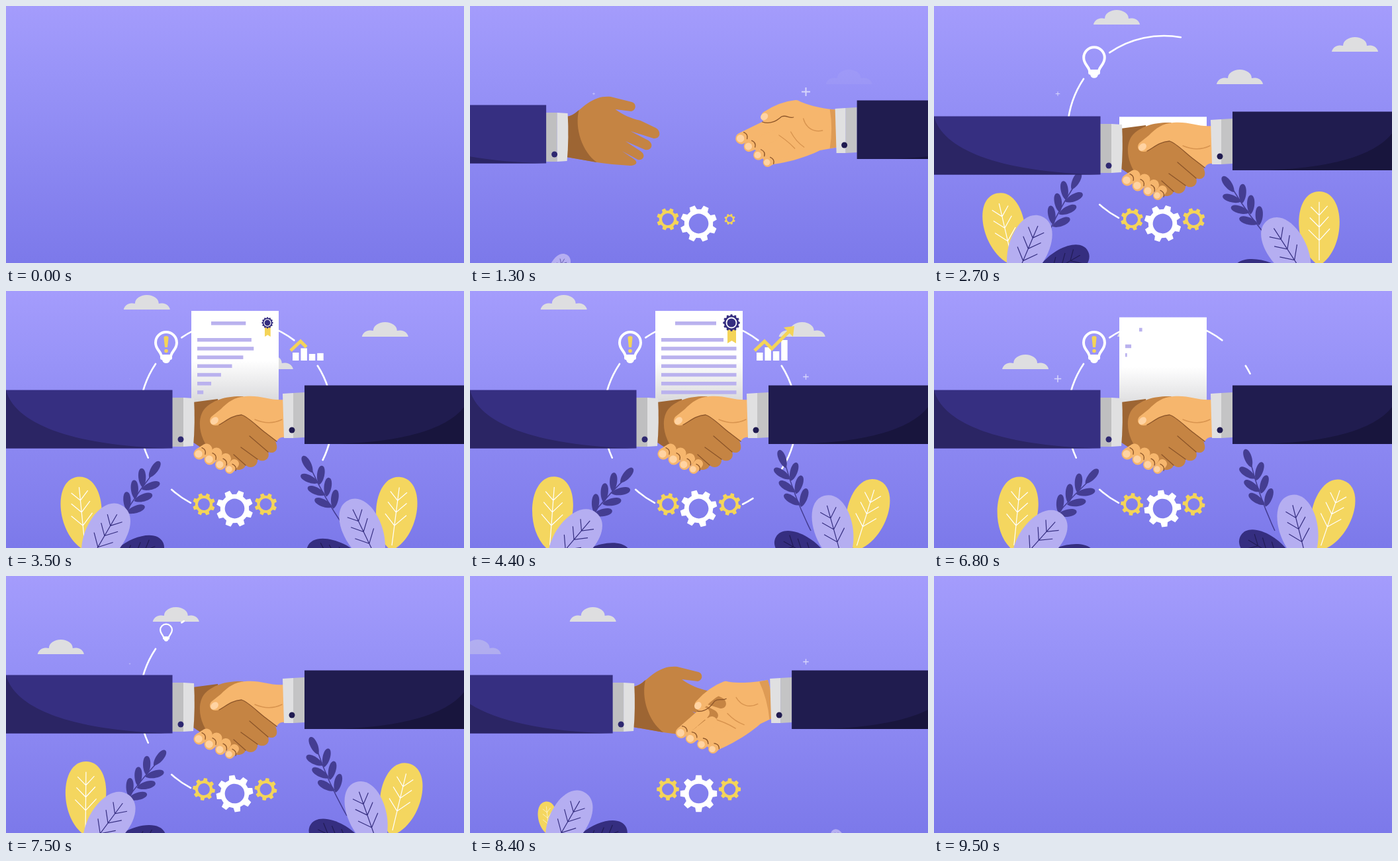
Animation of 692x388 px, one loop 10000 ms. Source, as an HTML page:

```html
<!DOCTYPE html>
<html lang="en">
<head>
<meta charset="utf-8">
<title>Handshake</title>
<style>
html, body { margin: 0; width: 100%; height: 100%; overflow: hidden; background: #8e8af3; }
svg { display: block; width: 100%; height: 100%; }
.brown { fill: #c58443; }
.brownShade { fill: #9d6533; }
.tan { fill: #f6b66d; }
.finger { stroke: #f6b66d; stroke-linecap: round; fill: none; }
.nail { fill: #ffd3a2; }
.crease { fill: none; stroke: #8c5529; stroke-width: 1.3; stroke-linecap: round; }
.soft { fill: none; stroke: #d8944f; stroke-width: 1.4; stroke-linecap: round; }
</style>
</head>
<body>
<svg viewBox="0 0 692 388">
  <defs>
    <linearGradient id="sky" x2="0" y2="1">
      <stop offset="0" stop-color="#a49cfc"/><stop offset=".25" stop-color="#9994f8"/>
      <stop offset="1" stop-color="#7c79ea"/>
    </linearGradient>
    <linearGradient id="paper" gradientUnits="userSpaceOnUse" x1="0" y1="75" x2="0" y2="136">
      <stop offset="0" stop-color="#fff"/><stop offset="1" stop-color="#dadadc"/>
    </linearGradient>
    <clipPath id="above"><rect width="692" height="190"/></clipPath>
  </defs>
  <rect width="692" height="388" fill="url(#sky)"/>
  <g id="clouds" fill="#dedee0"></g>
  <g id="sparks" stroke="#fff" stroke-width="2" opacity=".62"></g>
  <g id="arcs" fill="none" stroke="#fff" stroke-width="2.6" stroke-linecap="round"></g>

  <g id="bulb">
    <path d="M235 98C233 90 226 88 226 78A16 16 0 0 1 258 78C258 88 251 90 249 98Z" fill="none" stroke="#fff" stroke-width="4"/>
    <path d="M233 96H251V101Q251 104 248 104Q247 109 242 109Q237 109 236 104Q233 104 233 101Z" fill="#fff"/>
    <g id="mark" fill="#f4d458"><path d="M238.5 71Q238 68 242 68Q246 68 245.500 71L244 85H240Z"/><circle cx="242" cy="90.500" r="2.800"/></g>
  </g>

  <g id="chart">
    <g id="bars" fill="#fff"></g>
    <path id="trend" d="M430 90L445 76L456 87L483 60" pathLength="1" stroke-dasharray="1 2" fill="none" stroke="#f4d458" stroke-width="5"/>
    <path id="arrow" d="M474 55L490 53L488 69Z" fill="#f4d458"/>
  </g>

  <g clip-path="url(#above)"><g id="doc">
    <rect x="280" width="132" height="170" fill="url(#paper)"/>
    <g id="lines" fill="#bab2ee"></g>
    <g id="badge">
      <path d="M-6 8H7V31L.5 27L-6 31Z" fill="#f4d458"/>
      <path id="rosette" fill="#352e80"/>
      <circle r="7.500" fill="#352e80" stroke="#fff" stroke-width="1.800"/>
    </g>
  </g></g>

  <g id="plants"></g>

  <g id="shake">
    <g id="clasp">
      <path class="brownShade" d="M282 168L320 163L330 240L300 240L282 228Z"/>
      <path class="brown" d="M300 178C312 164 335 158 358 159L400 200L409 233C411 243 402 246 396 243C400 254 388 260 380 254C381 264 370 270 362 263C360 270 350 272 344 268L312 244C294 228 286 195 300 178Z"/>
      <path class="crease" d="M355 236L380 254M368 219L396 243M344 247L362 263"/>
      <path class="tan" d="M420 164C400 166 385 157 362 159C345 160 335 168 325 178L310 190C304 198 312 206 322 202C332 197 340 188 356 187C366 190 380 205 392 214L409 227C412 222 416 220 420 221Z"/>
      <path class="crease" d="M322 202C332 197 340 188 356 187C366 190 380 205 392 214L409 227"/>
      <path class="soft" d="M376 194C390 200 405 200 417 194"/>
      <ellipse class="nail" cx="315" cy="196" rx="6.500" ry="5" transform="rotate(-40 315 196)"/>
      <g id="claspFingers"></g>
    </g>
    <g id="openHands">
      <g class="rightOpen"><g class="turn">
        <path class="tan" d="M556 157C530 155 512 150 500 145C490 140 470 146 458 165C440 180 420 190 415 200L450 240C480 237 510 227 528 218L556 213Z"/>
        <path d="M543 156L556 157V213L543 215Q548 185 543 156Z" fill="#de9b55"/>
        <path class="soft" d="M503 170C507 184 518 191 532 188M458 190Q478 202 490 215M484 190Q492 205 504 213"/>
      </g></g>
      <g id="leftOpen"><g transform="translate(136)">
        <path class="brown" d="M146 167C160 165 166 155 178 147C190 139 200 136 213 137L245 145C252 147 252 157 244 159L220 156C232 165 245 170 258 173L281 184C290 189 288 201 278 200L243 189L270 203C279 209 274 219 265 217L235 204L258 219C267 225 262 234 254 232L230 219L248 231C256 237 250 241 242 241C225 240 205 238 192 236L146 228Z"/>
        <path class="brownShade" d="M146 167C156 166 161 160 165 157C158 185 170 220 192 236L146 228Z"/>
      </g></g>
      <g class="rightOpen"><g class="turn">
        <g id="openFingers"></g>
        <path class="finger" stroke-width="16" d="M492 150Q470 152 447 167"/>
        <path class="crease" d="M441 175C455 180 465 171 470 167C478 164 481 170 488 168"/>
        <ellipse class="nail" cx="444" cy="167" rx="6" ry="5" transform="rotate(-40 444 167)"/>
      </g></g>
    </g>
    <g id="leftArm">
      <path d="M251 161H268V235H251Z" fill="#bfbfc0"/>
      <path d="M268 161L284 162Q286 200 283 234L268 235Z" fill="#e0e0e1"/>
      <circle cx="264" cy="224" r="4.500" fill="#2e2870"/>
      <path d="M-200 149.500H251.500V237.500H-200Z" fill="#362f81"/>
      <path d="M0 149.500C12 198 95 234 251 237.500H-200V149.500Z" fill="#2b2564"/>
    </g>
    <g id="rightArm">
      <path d="M418 155L434 154V222L420 222Z" fill="#e0e0e1"/>
      <path d="M434 154L451 153V221L434 222Z" fill="#c4c4c5"/>
      <circle cx="432" cy="210" r="4.500" fill="#201b50"/>
      <path d="M451 142.500H900V231H451Z" fill="#201c4f"/>
      <path d="M700 162C680 208 600 228 500 231H900V162Z" fill="#18153d"/>
    </g>
  </g>
  <g id="gears"></g>
</svg>
<script>
const LOOP = 10000, MIRROR = 9950;
const $ = id => document.getElementById(id);
const clamp = x => Math.min(1, Math.max(0, x));
const ramp = (t, a, b) => clamp((t - a) / (b - a));
const smooth = x => x * x * (3 - 2 * x);
const easeOut = x => 1 - (1 - x) ** 2;
const place = (el, value) => el.setAttribute('transform', value);

function add(parent, tag, attrs = {}) {
  const el = document.createElementNS('http://www.w3.org/2000/svg', tag);
  for (const name in attrs) el.setAttribute(name, attrs[name]);
  return parent.appendChild(el);
}

// Value at time t from [time, value] pairs.
function key(t, points, ease = smooth) {
  if (t <= points[0][0]) return points[0][1];
  for (let i = 1; i < points.length; i++) {
    const [a, from] = points[i - 1], [b, to] = points[i];
    if (t < b) return from + (to - from) * ease((t - a) / (b - a));
  }
  return points[points.length - 1][1];
}

function gearPath(teeth, outer, root, hole) {
  const points = [];
  const step = 2 * Math.PI / teeth;
  for (let i = 0; i < teeth; i++) {
    for (const [part, r] of [[-.31, root], [-.19, outer], [.19, outer], [.31, root]]) {
      const a = (i + part) * step - Math.PI / 2;
      points.push((r * Math.cos(a)).toFixed(2) + ' ' + (r * Math.sin(a)).toFixed(2));
    }
  }
  const ring = hole ? `M${hole} 0A${hole} ${hole} 0 1 0 ${-hole} 0A${hole} ${hole} 0 1 0 ${hole} 0Z` : '';
  return `M${points.join('L')}Z${ring}`;
}

const leafPath = (len, k) =>
  `M0 0C${-k} ${-len * .22} ${-k} ${-len} 0 ${-len}C${k} ${-len} ${k} ${-len * .22} 0 0Z`;

// Clouds drift left; x is the position at 2700 ms.
const clouds = [
  { x: 241, y: 6, fade: [[1500, 0], [2000, 1]] },
  { x: 601, y: 47, fade: [[9000, 1], [9500, 0]] },
  { x: 427, y: 96, fade: [[1200, 0], [1900, 1], [8100, 1], [8600, 0]] }
].map(c => ({ ...c, el: add($('clouds'), 'path', {
  d: 'M0 22A13 11 0 0 1 17 13A18 13 0 0 1 53 13A13 11 0 0 1 70 22Z' }) }));

const sparks = [
  { x: 187, y: 132.5, size: [[900, 0], [1300, .3], [1600, 0], [2400, 0], [2700, .5], [3000, 1], [3600, 0], [6400, 0], [6800, .8], [7000, 1], [7700, 0]] },
  { x: 507.500, y: 129.500, size: [[600, 0], [1300, 1], [2100, 0], [4000, 0], [4400, .65], [5000, 1], [6000, .8], [6850, 0], [8000, 0], [8400, .65], [8800, 1], [9400, 0]] }
].map(s => ({ ...s, el: add($('sparks'), 'path', { d: 'M-6.500 0H6.500M0 -6.500V6.500' }) }));

// Angles in degrees, clockwise around the ring.
const arcs = [[118, 131.800], [155.400, 213.700], [235.700, 307], [327.600, 393.500], [416.800, 423.800]]
  .map(([from, to]) => ({ from, to, el: add($('arcs'), 'path') }));
const ringPoint = deg => {
  const a = deg * Math.PI / 180;
  return `${347.5 + 146 * Math.cos(a)} ${191 + 146 * Math.sin(a)}`;
};

const bars = [12, 20, 14, 31].map((h, i) => ({ h, el: add($('bars'), 'rect', { x: 433 + i * 12.400, width: 9.500 }) }));

const lines = [[310, 16, 62, 3050]];
for (let i = 0; i < 7; i++) lines.push([289, 41 + i * 13.200, i ? 113.500 : 94, 3035 + i * 60]);
const lineEls = lines.map(([x, y]) => add($('lines'), 'rect', { x, y, height: 5.500 }));
$('rosette').setAttribute('d', gearPath(12, 12.800, 11, 0));

const gears = [
  { x: 299, y: 322, r: 17, start: 700, spin: -1, color: '#f4d458' },
  { x: 345.500, y: 328.500, r: 28, start: 600, spin: 1, color: '#fff' },
  { x: 392.500, y: 322, r: 17, start: 1180, spin: -1, color: '#f4d458' }
].map(g => ({ ...g, el: add($('gears'), 'path', {
  d: gearPath(8, g.r, g.r * .78, g.r * .53), fill: g.color, 'fill-rule': 'evenodd' }) }));

const YELLOW = '#f4d65f', LILAC = '#b5aef1', DARK = '#352e80';
const plants = [
  { twig: true, x: 162, y: 368, angle: 37, flex: .75, start: 1700 },
  { twig: true, x: 515, y: 362, angle: -25, flex: .9, start: 1850 },
  { x: 120, y: 392, angle: 0, len: 112, k: 41, color: YELLOW, vein: '#fff', start: 1430 },
  { x: 582, y: 392, angle: 13, len: 112, k: 41, color: YELLOW, vein: '#fff', start: 1700 },
  { x: 150, y: 417, angle: 73, len: 95, k: 31, color: DARK, vein: '#211c55', start: 1150 },
  { x: 545, y: 418, angle: -65, len: 95, k: 31, color: DARK, vein: '#211c55', start: 1550 },
  { x: 120, y: 419, angle: 36, len: 110, k: 40, color: LILAC, vein: DARK, start: 1180 },
  { x: 565, y: 415, angle: -20, len: 110, k: 39, color: LILAC, vein: DARK, start: 1470 }
].map(p => ({ ...p, el: add($('plants'), 'g') }));

for (const p of plants) p.twig ? drawTwig(p.el) : drawLeaf(p);

function drawLeaf({ el, len, k, color, vein }) {
  add(el, 'path', { d: leafPath(len, k), fill: color });
  let d = `M0 -8V${-len * .86}`;
  for (const f of [.34, .52, .68]) {
    const y = -len * f, w = 17 * (1.15 - f * .6);
    d += `M${-w} ${y - w}L0 ${y}L${w} ${y - w * 1.1}`;
  }
  add(el, 'path', { d, fill: 'none', stroke: vein, 'stroke-width': 1.2 });
}

function drawTwig(el) {
  add(el, 'path', { d: 'M0 0Q-5 -55 0 -106', fill: 'none', stroke: '#443d92', 'stroke-width': 1.5 });
  const sprig = (y, turn) => add(el, 'path', {
    d: leafPath(29, 7.500), fill: '#443d92', transform: `translate(-1 ${y}) rotate(${turn})` });
  sprig(-102, 0);
  for (const y of [-42, -63, -84]) { sprig(y, -36); sprig(y + 3, 38); }
}

// Each finger: root x, y, tip x, y, width.
function drawFingers(parent, fingers) {
  for (const [x1, y1, x2, y2, w] of fingers) {
    add(parent, 'path', { class: 'finger', 'stroke-width': w, d: `M${x1} ${y1}L${x2} ${y2}` });
    const h = w * .55;
    add(parent, 'path', { class: 'crease', d: `M${x2 + 4} ${y2 - h}q7 3 5 10` });
    add(parent, 'circle', { class: 'nail', cx: x2 - 1, cy: y2, r: w * .34 });
  }
}
drawFingers($('claspFingers'), [[303, 239, 292, 246, 17], [318, 245, 308, 254, 17], [332, 253, 324, 262, 16], [345, 261, 338, 269, 14]]);
drawFingers($('openFingers'), [[450, 180, 409, 200, 17], [458, 196, 421, 212, 16], [466, 209, 435, 225, 15], [474, 221, 449, 236, 14]]);

const rightOpen = document.querySelectorAll('.rightOpen');
const turns = document.querySelectorAll('.turn');

function drawHands(t, u) {
  const gap = 216 * (1 + Math.cos(Math.PI * ramp(u, 500, 1790)));
  const bob = key(t, [[1800, 0], [2100, 17], [2400, 0], [2700, 17], [3000, 0]]);
  place($('shake'), `translate(0 ${bob})`);
  place($('leftArm'), `translate(${-gap})`);
  place($('leftOpen'), `translate(${-gap})`);
  place($('rightArm'), `translate(${gap * .98})`);
  rightOpen.forEach(el => place(el, `translate(${gap * .98 - 133})`));
  turns.forEach(el => place(el, `rotate(${-15 * clamp((136 - gap) / 97)} 552 188)`));
  const joined = gap < 12;
  $('clasp').setAttribute('display', joined ? 'inline' : 'none');
  $('openHands').setAttribute('display', joined ? 'none' : 'inline');
}

function drawScenery(t, u) {
  for (const c of clouds) {
    place(c.el, `translate(${c.x - (t - 2700) * .079} ${c.y})`);
    c.el.setAttribute('opacity', key(t, c.fade));
  }
  for (const s of sparks) place(s.el, `translate(${s.x} ${s.y}) scale(${key(t, s.size)})`);
  for (const g of gears) {
    const size = easeOut(ramp(u, g.start, g.start + 420));
    place(g.el, `translate(${g.x} ${g.y}) rotate(${g.spin * (t - 8400) * .06}) scale(${size})`);
  }
  const sway = key(t, [[500, -3], [1600, -5], [2700, -13], [4500, 4.500], [5600, -5], [6700, 6], [8400, -6]]);
  for (const p of plants) {
    const size = easeOut(ramp(u, p.start, p.start + 450));
    place(p.el, `translate(${p.x} ${p.y}) rotate(${p.angle + sway * (p.flex || 1)}) scale(${size})`);
  }
}

function drawRing(u) {
  const front = key(u, [[1750, 118], [2700, 280], [3150, 333], [3750, 424]], x => x);
  for (const { from, to, el } of arcs) {
    const end = Math.min(front, to);
    el.setAttribute('d', end > from ? `M${ringPoint(from)}A146 146 0 0 1 ${ringPoint(end)}` : '');
  }
  const pop = (id, x, y, a, b) => {
    const s = easeOut(ramp(u, a, b));
    place($(id), `translate(${x} ${y}) scale(${s}) translate(${-x} ${-y})`);
  };
  pop('bulb', 242, 86, 2300, 2750);
  pop('mark', 242, 92, 2720, 3050);
  pop('arrow', 483, 60, 3650, 3850);
  bars.forEach(({ h, el }, i) => {
    const height = h * easeOut(ramp(u, 3200 + i * 80, 3500 + i * 80));
    el.setAttribute('y', 105 - height);
    el.setAttribute('height', height);
  });
  const drawn = ramp(u, 3300, 3750);
  $('trend').setAttribute('stroke-dashoffset', 1 - drawn);
  $('trend').setAttribute('display', drawn ? 'inline' : 'none');
}

function drawDocument(u) {
  place($('doc'), `translate(0 ${190 - 160 * smooth(ramp(u, 2526, 3260))})`);
  lines.forEach(([, , width, start], i) =>
    lineEls[i].setAttribute('width', width * smooth(ramp(u, start, start + 600))));
  place($('badge'), `translate(395 18) scale(${easeOut(ramp(u, 3350, 3700))})`);
}

function render(now) {
  const t = Math.floor(now % LOOP / 100) * 100;
  // The scene builds up, then folds away along the same path.
  const u = t < 5000 ? t : MIRROR - t;
  drawScenery(t, u);
  drawRing(u);
  drawDocument(u);
  drawHands(t, u);
  const empty = t < 500 || t >= 9500;
  for (const id of ['clouds', 'sparks', 'plants', 'gears', 'shake'])
    $(id).setAttribute('visibility', empty ? 'hidden' : 'visible');
}

const begin = performance.now();
function tick() {
  render(performance.now() - begin);
  requestAnimationFrame(tick);
}
tick();
</script>
</body>
</html>
```
